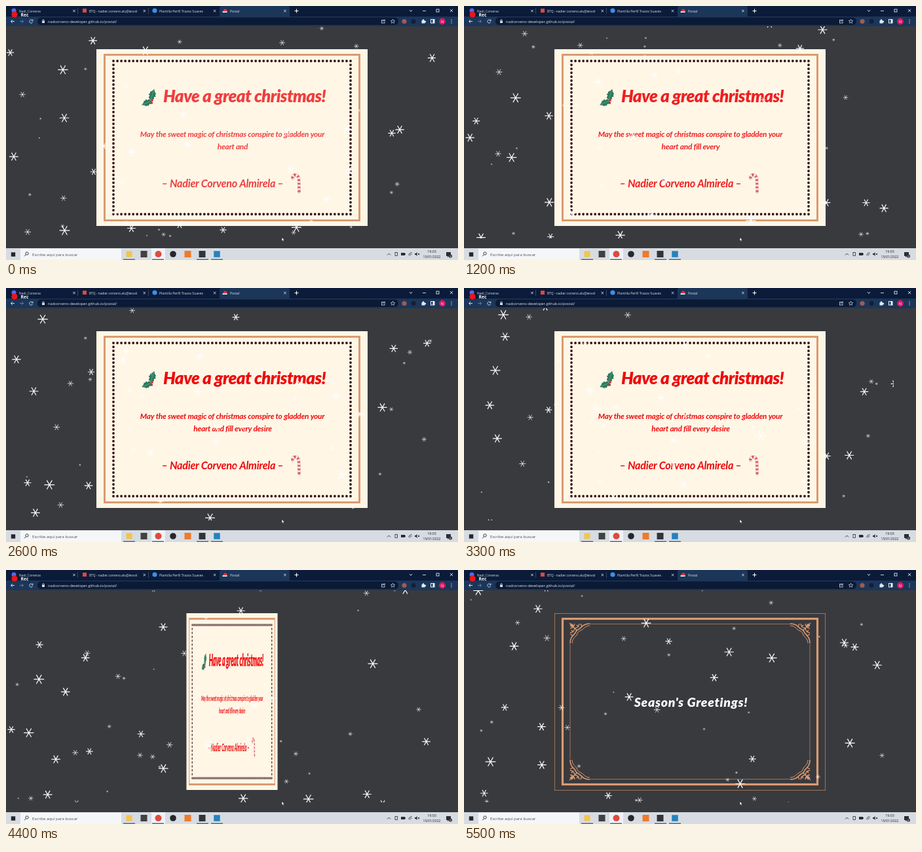
Recreate the animation shown at these times as an HTML page with a canvas. Size 690x388 px, loop 5600 ms.

```html
<!DOCTYPE html>
<html lang="es">
<head>
<meta charset="utf-8">
<title>Postal</title>
<style>
html, body { margin: 0; width: 100%; height: 100%; overflow: hidden; background: #393a3e; }
canvas { display: block; }
</style>
</head>
<body>
<canvas id="stage" width="690" height="388"></canvas>
<script>
const ctx = document.getElementById('stage').getContext('2d');
const LOOP = 5600, STEP = 100, TAU = Math.PI * 2;
const PAGE = '#393a3e', TAN = '#dc9a70', CREAM = '#fff6e6';
const UI = '"Open Sans", sans-serif', SCRIPT = 'Lato, sans-serif';

// ---------- helpers ----------
function rect(x, y, w, h, color) {
  ctx.fillStyle = color;
  ctx.fillRect(x, y, w, h);
}
function box(x0, y0, x1, y1, color, width) {
  ctx.strokeStyle = color;
  ctx.lineWidth = width;
  ctx.strokeRect(x0, y0, x1 - x0, y1 - y0);
}
function disc(x, y, r, color) {
  ctx.fillStyle = color;
  ctx.beginPath();
  ctx.arc(x, y, r, 0, TAU);
  ctx.fill();
}
function pill(x, y, w, h, r, color) {
  ctx.fillStyle = color;
  ctx.beginPath();
  ctx.roundRect(x, y, w, h, r);
  ctx.fill();
}
function square(x, y, size, color) {
  rect(x - size / 2, y - size / 2, size, size, color);
}
function stroke(d, color, width = 1) {
  ctx.strokeStyle = color;
  ctx.lineWidth = width;
  ctx.stroke(new Path2D(d));
}
function fill(d, color) {
  ctx.fillStyle = color;
  ctx.fill(new Path2D(d));
}
function text(str, x, y, font, color, align = 'left', spacing = 0) {
  ctx.font = font;
  ctx.fillStyle = color;
  ctx.textAlign = align;
  ctx.letterSpacing = spacing + 'px';
  ctx.fillText(str, x, y);
}
function label(str, x, y, size, color, align) {
  text(str, x, y, size + 'px ' + UI, color, align);
}
function random(seed) {
  return () => {
    seed = (seed + 0x6D2B79F5) | 0;
    let n = Math.imul(seed ^ (seed >>> 15), 1 | seed);
    n = (n + Math.imul(n ^ (n >>> 7), 61 | n)) ^ n;
    return ((n ^ (n >>> 14)) >>> 0) / 4294967296;
  };
}
const clamp = v => Math.max(0, Math.min(1, v));

// ---------- snow ----------
// Radii spread evenly from dust to large flakes; larger ones fall faster.
const rnd = random(24), COUNT = 58;
const flakes = Array.from({ length: COUNT }, (_, i) => {
  const r = 1 + 7 * i / COUNT;
  return { x: rnd() * 672, y: rnd() * 340, r, vx: (rnd() - 0.25) * 55, vy: 20 + 12 * r };
});

function flake(x, y, r) {
  ctx.globalAlpha = clamp(0.3 + r / 9);
  ctx.lineWidth = r > 5 ? 1.2 : 0.9;
  ctx.beginPath();
  for (let a = 0; a < 3; a++) {
    const dx = Math.cos(a * TAU / 6) * r, dy = Math.sin(a * TAU / 6) * r;
    ctx.moveTo(x - dx, y - dy);
    ctx.lineTo(x + dx, y + dy);
  }
  ctx.stroke();
}
function snow(t) {
  ctx.save();
  ctx.beginPath();
  ctx.rect(0, 31, 656, 324);
  ctx.clip();
  ctx.strokeStyle = '#fff';
  const s = t / 1000;
  for (const f of flakes) {
    flake((f.x + f.vx * s + 672) % 672 - 8, 23 + (f.y + f.vy * s) % 340, f.r);
  }
  ctx.restore();
}

// ---------- card ----------
function dots() {
  for (let i = 0; i <= 60; i++) {
    const x = 164 + i * 362 / 60;
    disc(x, 84, 1.9, '#35151a');
    disc(x, 318, 1.9, '#35151a');
  }
  for (let i = 1; i < 39; i++) {
    disc(164, 84 + i * 6, 1.9, '#35151a');
    disc(526, 84 + i * 6, 1.9, '#35151a');
  }
}
function leaf(x, y, angle, size) {
  ctx.save();
  ctx.translate(x, y);
  ctx.rotate(angle);
  ctx.scale(size, size);
  fill('M0 0Q1 -5 4 -4Q5 -2 7 -6Q9 -3 11 -5Q12 -2 17 0Q12 2 11 5Q9 3 7 6Q5 2 4 4Q1 5 0 0', '#2c7a5c');
  stroke('M1 0H14', '#69a486', 0.8);
  ctx.restore();
}
function holly() {
  leaf(221, 143, -1.25, 1);
  leaf(222, 145, 2.75, 0.95);
  disc(223, 144, 2, '#e0353c');
  disc(222.5, 148, 1.7, '#c9282f');
}
function cane() {
  const d = 'M447.5 284L447 264Q446 258 441 258Q437 259 437.5 263';
  ctx.lineCap = 'round';
  stroke(d, '#e6bdb9', 4.8);
  ctx.lineCap = 'butt';
  stroke(d, '#fbeae4', 3.6);
  ctx.setLineDash([2.6, 3]);
  stroke(d, '#db5660', 4);
  ctx.setLineDash([]);
}
function front(t) {
  rect(138, 66, 414, 270, CREAM);
  box(150.5, 74.5, 539.5, 327.5, TAN, 3);
  dots();
  holly();
  const k = clamp(t / 2100);
  const red = `rgb(240,${Math.round(62 - 54 * k)},${Math.round(62 - 52 * k)})`;
  text('Have a great christmas!', 364, 147, 'italic 900 26px ' + SCRIPT, red, 'center', -0.6);
  const body = 'italic bold 11.8px ' + SCRIPT;
  text('May the sweet magic of christmas conspire to gladden your', 345.5, 200, body, red, 'center', -0.2);
  const typed = 10 + Math.floor((t + 105) / 130);
  text('heart and fill every desire'.slice(0, typed).trim(), 346, 218.5, body, red, 'center', -0.2);
  text('– Nadier Corveno Almirela –', 330.5, 276.5, 'italic bold 16.2px ' + SCRIPT, red, 'center', -0.25);
  cane();
}
function corner(sx, sy) {
  ctx.save();
  ctx.translate(345, 201);
  ctx.scale(sx, sy);
  ctx.translate(-185, -121);
  stroke('M32 2C20 2 20 9 14 11Q12 12 11 14C9 20 2 20 2 32', TAN, 1.6);
  stroke('M32 5C24 5 23 11 17 13Q14 14 13 17C11 23 5 24 5 32', TAN);
  stroke('M1 1L13 13M2 9Q8 9 9 2M9 9Q15 8 16 2M9 9Q8 15 2 16', TAN, 1.3);
  stroke('M2 5L5 2M12 4L15 7M4 12L7 15M18 2L20 6M2 18L6 20', TAN, 1.3);
  fill('M5 2L8 5L5 8L2 5Z', TAN);
  ctx.restore();
}
function back() {
  rect(138, 66, 414, 270, PAGE);
  box(138.5, 66.5, 551.5, 336.5, '#a87b5c', 0.9);
  box(150.5, 74.5, 539.5, 327.5, TAN, 3.2);
  stroke('M192 82.5H498M192 319.5H498M162 113V289M528 113V289', '#a87b5c', 0.9);
  for (const sx of [1, -1]) for (const sy of [1, -1]) corner(sx, sy);
  text("Season's Greetings!", 346.5, 208.5, 'italic 900 19.5px ' + SCRIPT, '#fff', 'center', 0.7);
}
function card(t) {
  const u = clamp((t - 3970) / 1000);
  const turn = Math.cos(Math.PI * (1 - Math.cos(Math.PI * u)) / 2);
  ctx.save();
  ctx.translate(345, 0);
  ctx.scale(Math.max(0.005, Math.abs(turn)), 1);
  ctx.translate(-345, 0);
  if (turn > 0) front(t); else back();
  ctx.restore();
}

// ---------- browser ----------
function cross(x, y, r, color) {
  stroke(`M${x - r} ${y - r}L${x + r} ${y + r}M${x + r} ${y - r}L${x - r} ${y + r}`, color, 0.9);
}
function tabs() {
  const ink = '#dfe5ef';
  rect(0, 0, 690, 16, '#0b1b39');
  pill(326, 0, 107, 18, 3, '#1c3659');
  rect(109, 3, 0.8, 9, '#44546f');
  rect(217, 3, 0.8, 9, '#44546f');
  disc(12, 7, 3.5, '#5865f2');
  square(120, 7, 6, '#e0483c');
  disc(227, 7, 3.6, '#3f8ee8');
  label('Nadi_Corveras', 20, 9.5, 4.9, ink);
  label('BTQ - nadier.corveno.alu@iesvol', 127, 9.5, 4.9, ink);
  label('Plantilla Perfil Trazos Suaves', 234, 9.5, 5.1, ink);
  label('Postal', 342, 9.5, 5.1, ink);
  fill('M331 9Q332 4 335 4.5Q338 5 338 9Z', '#d9363c');
  rect(330.5, 8.3, 7, 1.7, '#f2f2f2');
  for (let i = 0; i < 4; i++) cross(104 + i * 107.3, 7.5, 1.7, ink);
  stroke('M440.5 7.5H446.5M443.5 4.5V10.5', '#fff', 1.1);
  stroke('M616 6L618 8.5L620 6M636 7.5H641', ink, 0.9);
  box(657, 5, 661, 9, ink, 0.9);
  cross(680, 7, 2.2, ink);
}
function star(x, y, r, color) {
  ctx.strokeStyle = color;
  ctx.lineWidth = 0.7;
  ctx.beginPath();
  for (let i = 0; i < 10; i++) {
    const a = i * TAU / 10 - TAU / 4, d = i % 2 ? r * 0.45 : r;
    ctx.lineTo(x + Math.cos(a) * d, y + Math.sin(a) * d);
  }
  ctx.closePath();
  ctx.stroke();
}
function toolbar() {
  const ink = '#d3dbe7';
  rect(0, 16, 690, 15, '#1c3659');
  pill(48, 17.5, 551, 11.5, 5.5, '#0b1a35');
  stroke('M13 23.5H7.5M10 21L7.5 23.5L10 26', ink);
  stroke('M21 23.5H26.5M24 21L26.5 23.5L24 26', '#687c98');
  stroke('M40.5 22A2.6 2.6 0 1 0 40.8 24.5M41 20.5V22.7H38.7', ink, 0.9);
  rect(55, 22.5, 4, 3.5, ink);
  stroke('M55.8 22.5V21.3Q57 19.5 58.2 21.3V22.5', ink, 0.8);
  label('nadcorveno-developer.github.io/postal/', 64, 25.5, 5.7, '#e5eaf2');
  box(573.5, 21.5, 578, 26, ink, 0.8);
  stroke('M575 24Q576 21 579 21', ink, 0.8);
  star(590.5, 23.5, 3.4, ink);
  disc(608, 23.5, 3.6, '#a15b4c');
  disc(622, 23.5, 3.4, '#10203c');
  rect(634.5, 22, 5, 4.5, '#e2e8f0');
  disc(637, 21.5, 1.3, '#e2e8f0');
  disc(640, 24, 1.2, '#e2e8f0');
  box(648.5, 20.5, 654, 26, '#eef2f7', 1);
  rect(651.5, 20.5, 2.5, 5.5, '#eef2f7');
  disc(666, 23.5, 4.9, '#d81b60');
  label('N', 666, 25.6, 5.5, '#fff', 'center');
  for (let i = -1; i < 2; i++) disc(680, 23.5 + i * 2.5, 0.65, ink);
}
function recorder() {
  disc(13, 13, 4.6, '#f01414');
  text('Rec', 22.5, 15.5, 'bold 6.8px ' + UI, '#fff');
}

// ---------- taskbar ----------
function taskbar() {
  const ink = '#2b2d31';
  rect(0, 370, 690, 18, '#d7dce3');
  square(11, 379.5, 6.4, '#24262a');
  rect(22, 370.5, 154, 17.5, '#f5f6f8');
  ctx.strokeStyle = ink;
  ctx.lineWidth = 0.9;
  ctx.beginPath();
  ctx.arc(32, 378, 2.2, 0, TAU);
  ctx.stroke();
  stroke('M30.4 379.7L28 382.3', ink, 0.9);
  label('Escribe aquí para buscar', 40, 381.8, 6.1, '#4a4c50');
  rect(222, 370, 21, 18, '#eff2f6');
  square(188, 379, 9, '#f3c44c');
  square(210.5, 379, 10, '#414141');
  disc(232.5, 379, 5, '#dd4b3e');
  disc(255, 379, 4.8, '#25272a');
  square(277.5, 379, 10, '#ef7a2c');
  square(299.5, 379, 10, '#343434');
  square(322, 379, 9.5, '#2582bd');
  for (const x of [179, 223, 291, 313]) rect(x, 386.5, 18, 1.5, '#2677bd');
  stroke('M582 380.5L584.5 378L587 380.5', ink, 0.9);
  box(594, 376.5, 597.5, 381.5, ink, 0.8);
  rect(603, 377, 6, 4, ink);
  rect(609, 378, 0.8, 2, ink);
  stroke('M614.5 381Q615 377 619.5 376.5M616.5 381.5Q617 379 619.5 378.8', ink, 0.8);
  fill('M624 378H625.5L627.5 376V382L625.5 380H624Z', ink);
  cross(630, 379, 1.2, ink);
  label('19:03', 650, 377, 5.3, '#202226', 'center');
  label('15/01/2022', 650, 385, 5.1, '#202226', 'center');
  fill('M672 376H679V382H676L674 384V382H672Z', ink);
  disc(678.5, 382, 2.6, '#34363a');
  label('9', 678.5, 383.6, 4.2, '#fff', 'center');
}
function pointer() {
  const d = 'M421 353.5V359.2L422.4 358L423.3 360L424.3 359.5L423.4 357.6H425.2Z';
  fill(d, '#fff');
  stroke(d, '#111', 0.5);
}

function draw(now) {
  const t = Math.floor((now % LOOP) / STEP) * STEP;
  rect(0, 0, 690, 388, PAGE);
  card(t);
  snow(t);
  tabs();
  toolbar();
  recorder();
  taskbar();
  pointer();
}
const start = performance.now();
function frame() {
  draw(performance.now() - start);
  requestAnimationFrame(frame);
}
frame();
</script>
</body>
</html>
```
